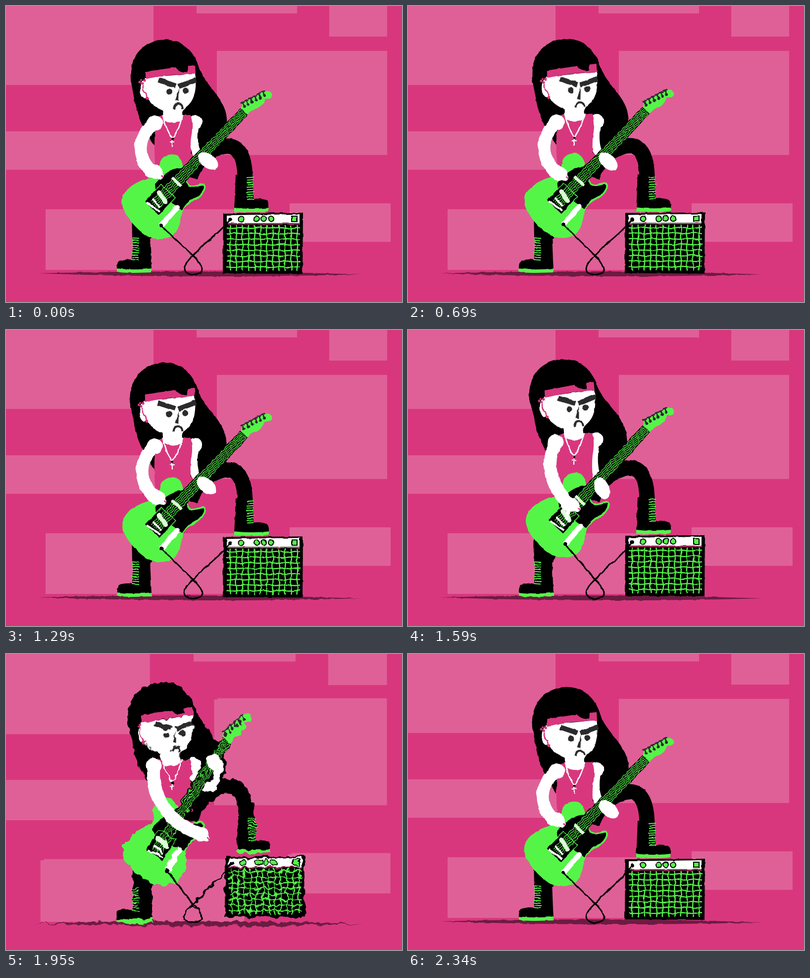
Write an HTML page that moves like this. It is 800 px wide and 600 px high and loops after 2.37 s.

```html
<!DOCTYPE html>
<html lang="en">
<head>
<meta charset="utf-8">
<title>Guitar player</title>
<style>
  html, body { margin: 0; width: 100%; height: 100%; overflow: hidden; background: #d8377e; }
  svg { display: block; width: 800px; height: 600px; }
  .pink { fill: #d8377e; }
  .green { fill: #55f548; }
  .white { fill: #fff; }
  .grey { fill: #2b2b2b; }
  .line { fill: none; stroke: #000; stroke-width: 3; stroke-linejoin: round; }
  .g { stroke: #55f548; }
  .w { stroke: #fff; }
  .p { stroke: #d8377e; }
  .d { stroke: #2b2b2b; }
  .round { stroke-linecap: round; }
</style>
</head>
<body>
<svg viewBox="0 0 800 600">
  <defs>
    <filter id="rough" filterUnits="userSpaceOnUse" x="0" y="0" width="800" height="600" color-interpolation-filters="sRGB">
      <feTurbulence id="noise" type="fractalNoise" baseFrequency=".07" numOctaves="2" result="n"/>
      <feColorMatrix in="n" values="1 0 0 0 0  0 1 0 0 0  0 0 1 0 0  0 0 0 0 1" result="map"/>
      <feDisplacementMap id="shift" in="SourceGraphic" in2="map" xChannelSelector="R" yChannelSelector="G"/>
    </filter>
    <filter id="steady" filterUnits="userSpaceOnUse" x="0" y="0" width="800" height="600" color-interpolation-filters="sRGB">
      <feTurbulence type="fractalNoise" baseFrequency=".06" numOctaves="2" seed="4" result="n"/>
      <feColorMatrix in="n" values="1 0 0 0 0  0 1 0 0 0  0 0 1 0 0  0 0 0 0 1" result="map"/>
      <feDisplacementMap scale="5" in="SourceGraphic" in2="map" xChannelSelector="R" yChannelSelector="G"/>
    </filter>
    <!-- heel at the left, sole on the zero line -->
    <g id="boot">
      <path d="M3,-76 L37,-75 L39,-27 Q55,-29 66,-24 Q71,-19 70,-7 H0 L1,-25 Z"/>
      <path class="green" d="M0,-9 Q35,-5 70,-9 L70,-3 Q66,0 36,0 L0,-1 Z"/>
      <path id="laces" class="line g" style="stroke-width:2"/>
    </g>
  </defs>

  <path id="wall" fill="#df6097"/>

  <g filter="url(#rough)">
    <path id="ground" fill="#6b1c41" d="M65,542 Q390,533 716,544 Q390,553 65,542Z"/>

    <path id="hair"/>
    <path id="thigh" class="line" style="stroke-width:31"/>
    <path id="leg"/>
    <use id="backBoot" href="#boot"/>

    <g id="amp">
      <path d="M439,420 L600,419 L599,543 L438,542Z"/>
      <path class="white" d="M446,424 L593,422 V440 H446Z"/>
      <path class="line p" style="stroke-width:2" d="M446,441.5 H593"/>
      <path id="grille" class="line g" style="stroke-width:2.4"/>
      <g class="green" stroke="#000" stroke-width="2">
        <circle cx="475" cy="432" r="5.5"/>
        <circle cx="506.5" cy="431.5" r="5.5"/>
        <circle cx="520.5" cy="431" r="5.5"/>
        <circle cx="535.5" cy="431.5" r="5.5"/>
        <path d="M577,426 H588 V437 H577Z"/>
      </g>
      <circle cx="453" cy="433" r="3.8"/>
    </g>
    <use id="frontBoot" href="#boot"/>

    <path id="fretArm" class="line w round" style="stroke-width:18"/>
    <circle id="fretShoulder" class="white" r="14.5"/>
    <path id="shirt" class="pink" d="M304,226 L316,221 H357 L373,221 Q379,240 374,265 Q371,290 376,325 L302,330 Q297,270 304,226Z"/>

    <g id="head">
      <ellipse class="white" cx="280" cy="168" rx="9" ry="19"/>
      <path class="white" d="M280,146 L382,136 C386,165 382,190 366,203 Q357,210 356,216 L357,231 Q338,243 318,231 L317,212 Q288,200 282,178Z"/>
      <path class="line p round" style="stroke-width:2.5" d="M276,161 Q274,172 283,177 L285,187"/>
      <g class="pink">
        <circle cx="270" cy="154" r="2.6"/><circle cx="275" cy="157" r="2.6"/>
        <circle cx="279" cy="151" r="2.8"/><circle cx="273" cy="150" r="2"/>
        <circle cx="285" cy="187" r="3"/>
        <path d="M282,133 L345,124 L382,120 L383,137 Q330,138 282,148Z"/>
      </g>
      <path d="M342,123 Q350,117 368,121 L367,134 Q349,135 342,123Z"/>
      <path class="line d" style="stroke-width:10" d="M308,150 L343,162 M349,163 L384,150"/>
      <g class="grey">
        <circle cx="330" cy="173.5" r="6"/><circle cx="363" cy="171.5" r="6"/>
        <path d="M350,167 L342,191 L349,193Z"/>
      </g>
      <path class="line d" style="stroke-width:4" d="M339,209 Q340,198 348,198 Q356,198 357,208"/>
    </g>

    <g id="chain">
      <path class="line w" style="stroke-width:2.6" d="M317,221 Q322,248 336,268 Q350,250 357,221"/>
      <path class="line w" style="stroke-width:2.2" d="M336,270 V285 M331,275.5 H341"/>
      <circle cx="336.5" cy="269.5" r="2.4"/>
    </g>

    <g id="guitar">
      <path class="green" d="M340,301 C352,303 356,315 358,328 C362,338 362,352 370,362 C380,370 390,358 399,360 C406,363 404,373 396,383 C384,397 366,397 358,414 C352,428 354,444 342,460 C330,474 305,476 286,467 C262,452 234,420 234,396 C236,368 270,352 300,346 C312,338 308,318 314,311 C320,302 332,300 340,301Z"/>
      <path d="M301,361 C310,350 325,334 345,329 L360,327 C364,336 360,352 367,364 C376,372 390,364 399,364 C402,370 395,380 388,386 C374,392 362,400 356,414 L338,401 L325,392 L302,372Z"/>
      <path class="line w round" style="stroke-width:11" d="M314,444 L345,409"/>
      <path class="green" d="M474,211 L477,195 Q500,187 520,174 Q531,170 536,176 Q540,184 533,188 L523,188 Q521,200 508,207 Q495,211 487,222Z"/>
      <path id="pegs" class="line round d"/>
      <g transform="translate(300 404) rotate(-46.4)">
        <path d="M-8,-20 H40 V20 H-8Z M38,-13 L262,-10 V10 L38,13Z"/>
        <path class="line g" style="stroke-width:1.5" d="M4,-20 H40 V20 H8"/>
        <path id="strings" class="line g" style="stroke-width:1.3"/>
        <path class="line round" style="stroke:#dcffd6;stroke-width:9" d="M25,-11 L20,11"/>
        <path class="line" style="stroke:#dcffd6;stroke-width:6" d="M65,-13 V13"/>
        <path class="line w" style="stroke-width:4" d="M-7,-16 L-2,17 M7,-12 L5,12"/>
      </g>
      <circle cx="313" cy="445" r="3.8"/>
    </g>

    <path id="cable" class="line"/>
    <ellipse id="fretHand" class="white" rx="23" ry="14"/>
  </g>

  <g filter="url(#steady)">
    <path id="lead" class="line"/>
    <path id="strumArm" class="line w round" style="stroke-width:26"/>
    <circle id="strumShoulder" class="white" r="15.5"/>
    <g id="strumHand">
      <ellipse class="white" cx="2" cy="1" rx="18" ry="14"/>
      <path class="line w round" style="stroke-width:12" d="M4,3 L16,10"/>
      <path id="finger" class="line w round" style="stroke-width:8"/>
      <path class="line p round" style="stroke-width:2.5" d="M18,8 L21,12"/>
    </g>
  </g>
</svg>

<script>
const LOOP = 2370, STRUM = 600, SHAKE = 1800;
const $ = id => document.getElementById(id);
const attr = (id, name, value) => $(id).setAttribute(name, value);
const move = (id, [x, y], rest = '') => attr(id, 'transform', `translate(${x} ${y}) ${rest}`);
const curve = ([x, y, ...c]) => `M${x},${y} C${c}`;
const range = n => Array.from({ length: n }, (_, i) => i);

// Offsets are relative to the resting pose; arms are cubic curves.
const rest = {
  head: [0, 0, 0], hair: [0, 0], body: [0, 0],
  strum: [302, 237, 262, 262, 265, 315, 296, 335], finger: [0],
  fret: [382, 236, 376, 265, 376, 300, 400, 312], hand: [408, 314, 35],
  guitar: [0, 0, 0, 1], boot: [0, 0], heel: [0, 0], amp: [0, 0], wall: [0], rough: [3.5]
};
const lift = {
  head: [-3, -13, -2.5], hair: [-7, -9], body: [-1, -12],
  strum: [299, 227, 278, 265, 283, 310, 326, 353], finger: [22],
  fret: [380, 222, 372, 255, 372, 290, 388, 312], hand: [392, 321, 68],
  guitar: [4, -11, -1, 1], boot: [0, -4], heel: [0, 0], amp: [0, -3], wall: [0], rough: [3.5]
};
const slam = {
  head: [-5, -10, -2], hair: [-6, -11], body: [-1, -8],
  strum: [299, 226, 292, 285, 325, 340, 390, 364], finger: [0],
  fret: [380, 225, 372, 285, 440, 290, 424, 222], hand: [423, 223, 65],
  guitar: [4, -3, -11.5, 1.02], boot: [4, -14], heel: [2, 5], amp: [4, -9], wall: [.5], rough: [13]
};
const peak = {
  head: [-9, -20, -5], hair: [-18, -26], body: [-3, -14],
  strum: [289, 222, 290, 285, 330, 340, 402, 371], finger: [0],
  fret: [373, 217, 372, 275, 440, 275, 425, 205], hand: [424, 201, 80],
  guitar: [7, -4, -15.6, 1.03], boot: [12, -20], heel: [3, 13], amp: [6, -18], wall: [1], rough: [21]
};

const mix = (a, b, k) => Object.fromEntries(Object.keys(a).map(
  key => [key, a[key].map((v, i) => v + (b[key][i] - v) * k)]));
const settle = { ...mix(rest, lift, .15), strum: rest.strum, finger: [0], amp: [0, -4], boot: [0, -4] };

const strumTimes = [0, 90, 150, 210, 300, 390, 450, 510];
const strumLift = [0, .2, .6, .95, 1.08, 1, .7, .3];
const easeOut = k => 1 - (1 - k) ** 2;
const smooth = k => k * k * (3 - 2 * k);

function stepAt(t) {
  if (t >= SHAKE) return t < 1830 ? SHAKE : Math.floor(t / 30) * 30;
  const p = t % STRUM;
  return t - p + strumTimes.filter(s => s <= p).pop();
}

function poseAt(t) {
  if (t < SHAKE) return mix(rest, lift, strumLift[strumTimes.indexOf(t % STRUM)]);
  if (t < 1950) return mix(rest, slam, easeOut((t - SHAKE) / 150));
  if (t < 2160) return mix(slam, peak, (t - 1950) / 210);
  return mix(peak, settle, smooth((t - 2160) / 180));
}

// Each wall panel is two overlapping blocks that drift apart while the stage shakes.
const panels = [[-40, -40, 298, 160], [385, -40, 588, 15], [653, -40, 770, 62], [426, 91, 770, 302],
  [-40, 254, 310, 332], [80, 412, 486, 535], [573, 400, 777, 478]];
function wallPath(k) {
  const block = (l, t, r, b) => `M${l},${t}H${r}V${b}H${l}Z`;
  const sx = x => x + (x - 800) * .029 * k, sy = y => y * (1 + .03 * k);
  return panels.map(([l, t, r, b]) =>
    block(sx(l), sy(t), sx(r), sy(b)) +
    block(sx(l) + 14 * k, sy(t) - 5 * k, sx(r), sy(b) - 3 * k)).join('');
}

function hairPath([x, y], [bx, by]) {
  const top = (a, b) => `${a + x},${b + y}`;
  const mid = (a, b) => `${a + (x + bx) / 2},${b + (y + by) / 2}`;
  const low = (a, b) => `${a + bx},${b + by * .4}`;
  return `M${top(252, 150)} C${top(248, 90)} ${top(290, 68)} ${top(322, 68)}
    C${top(360, 69)} ${top(382, 95)} ${top(391, 128)}
    C${mid(402, 160)} ${mid(444, 188)} ${mid(446, 228)}
    C${low(449, 268)} ${low(428, 288)} ${low(388, 302)} L${low(302, 285)}
    C${mid(283, 262)} ${mid(262, 220)} ${mid(259, 188)} Z`;
}

function jackPoint([x, y, turn, scale]) {
  const a = turn * Math.PI / 180, c = Math.cos(a) * scale, s = Math.sin(a) * scale;
  return [300 + x + 13 * c - 41 * s, 404 + y + 13 * s + 41 * c];
}

function draw(t) {
  const p = poseAt(t), [bx, by] = p.boot, [hx, hy] = p.heel, [ax, ay] = p.amp, k = p.wall[0];
  const [gx, gy, turn, scale] = p.guitar, cross = `378,${506 + 3 * k}`;
  attr('wall', 'd', wallPath(k));
  attr('ground', 'transform', `translate(${-11.7 * k} ${7 * k}) scale(${1 + .03 * k} 1)`);
  attr('hair', 'd', hairPath(p.hair, p.body));
  attr('thigh', 'd', `M372,${347 + by / 2} C385,${305 + by} 425,${284 + by * 1.2} 448,${284 + by * 1.2}
    C${475 + bx / 2},${284 + by * 1.2} ${483 + bx},${315 + by} ${483 + bx},${352 + by}`);
  attr('leg', 'd', `M254,415 H310 L${293 + hx},${472 + hy} H${255 + hx}Z`);
  move('backBoot', [294 + hx, 541 + hy], `scale(${-1 - .1 * k} 1)`);
  move('frontBoot', [461 + bx, 418 + by]);
  move('amp', p.amp);
  move('shirt', p.body);
  move('chain', p.body);
  move('head', p.head, `rotate(${p.head[2]} 335 205)`);
  move('guitar', [300 + gx, 404 + gy], `rotate(${turn}) scale(${scale}) translate(-300 -404)`);
  attr('lead', 'd', `M${jackPoint(p.guitar)} L${cross} L385,${513 + 2 * k}`);
  attr('cable', 'd', `M${cross} C392,520 402,535 392,541
    C380,547 366,545 361,537 C357,528 368,515 ${cross}
    L400,${483 + 3 * k} Q${432 + ax},${458 + ay / 2} ${453 + ax},${433 + ay}`);
  attr('fretArm', 'd', curve(p.fret));
  move('fretShoulder', p.fret);
  move('fretHand', p.hand, `rotate(${p.hand[2]})`);
  attr('strumArm', 'd', curve(p.strum));
  move('strumShoulder', p.strum);
  move('strumHand', p.strum.slice(6));
  attr('finger', 'd', `M-2,6 L-5,${6 + p.finger[0]}`);
  attr('noise', 'seed', 1 + t / 30);
  attr('shift', 'scale', p.rough[0]);
}

// Wavy line between two points, swinging across its own direction.
function wave(x1, y1, x2, y2, size, length, phase) {
  const d = Math.hypot(x2 - x1, y2 - y1), n = Math.ceil(d / 3);
  return 'M' + range(n + 1).map(i => {
    const f = i / n, s = size * Math.sin(f * d / length * 2 * Math.PI + phase) / d;
    return `${(x1 + (x2 - x1) * f - (y2 - y1) * s).toFixed(1)},${(y1 + (y2 - y1) * f + (x2 - x1) * s).toFixed(1)}`;
  }).join('L');
}

attr('grille', 'd',
  range(12).map(i => wave(453 + 12.3 * i, 444, 453 + 12.3 * i, 537, .8, 34, i * 2)).join('') +
  range(8).map(i => wave(446, 450 + 11.3 * i, 594, 450 + 11.3 * i, .8, 38, i * 1.7)).join(''));
attr('strings', 'd', range(6).map(i => wave(0, (i - 2.5) * 4.2, 261, (i - 2.5) * 3, .9, 13, i * .7)).join(''));
attr('laces', 'd', range(10).map(i => `M${25 + i % 2},${-70 + 4.9 * i} L${40 - i % 3},${-71 + 4.9 * i}`).join(''));
attr('pegs', 'd', range(6).map(i => {
  const x = 481 + 8.2 * i, y = 203.5 - 4.4 * i;
  return `M${x},${y} l-3,-8 m-3,1 l6,-2 M${x - 1.5},${y} a1.5,1.5 0 1 0 3,0 a1.5,1.5 0 1 0 -3,0`;
}).join(''));

let shown = -1;
const start = performance.now();
function tick() {
  const step = stepAt((performance.now() - start) % LOOP);
  if (step !== shown) draw(shown = step);
  requestAnimationFrame(tick);
}
tick();
</script>
</body>
</html>
```
